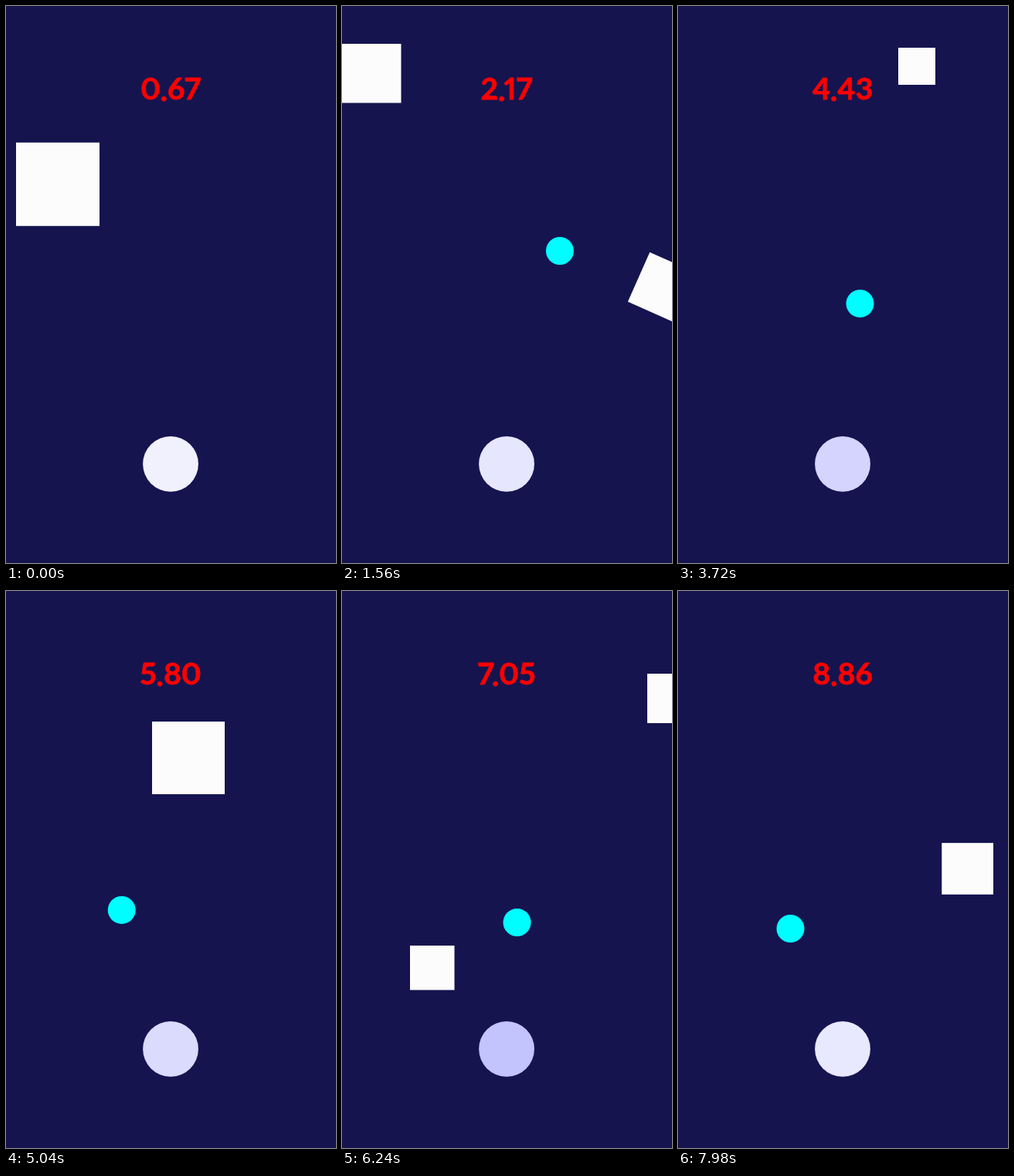
Recreate the animation shown at these times as an HTML page with a canvas. Size 427 by 721 pixels, loop 8 s.

```html
<!DOCTYPE html>
<html lang="en">
<head>
<meta charset="utf-8">
<title>Falling squares</title>
<style>
  html, body { margin: 0; width: 100%; height: 100%; overflow: hidden; background: #15144f; }
  canvas, svg { position: absolute; top: 0; left: 0; }
  text {
    font: bold 39px Lato, sans-serif;
    font-variant-numeric: proportional-nums;
    text-anchor: middle;
    fill: red; stroke: red; stroke-width: 0.8; stroke-linejoin: round;
  }
</style>
</head>
<body>
<canvas id="stage" width="427" height="721"></canvas>
<svg width="427" height="721">
  <text x="213" y="120.5"><tspan id="whole"></tspan><tspan dy="2.5">.</tspan><tspan id="decimals" dy="-2.5"></tspan></text>
</svg>
<script>
const ctx = document.getElementById('stage').getContext('2d');
const whole = document.getElementById('whole');
const decimals = document.getElementById('decimals');
const LOOP = 8000, STEP = 60, GRAVITY = 755;
const FIRST_SPAWN = -514, SPAWN_EVERY = 960;

// Squares appear at rest at a steady beat; some are later knocked away by the ball.
const squares = [
  { x: 13, y: 25, size: 108 },
  { x: 313, y: -6, size: 70, hit: { at: 1290, push: 252, keep: 0.23 } },
  { x: 0, y: 40, size: 76.5 },
  { x: 41, y: 44, size: 42.4 },
  { x: 285, y: -4.6, size: 48, hit: { at: 4300, push: 500, keep: 0.8 } },
  { x: 189, y: -45.6, size: 94, hit: { at: 5280, push: 215, keep: 0.9 } },
  { x: 88, y: 86, size: 57.5 },
  { x: 395, y: 106.6, size: 64 },
  { x: 341.3, y: 76, size: 66.7 }
];

// Turning points of the ball's sideways swing: time, x
const BALL_START = 780;
const swing = [
  [1300, 302], [1800, 264], [3720, 235.5], [4300, 267],
  [4950, 145.5], [5600, 226.5], [6300, 226.5], [7680, 145.5]
];

const clamp = v => Math.min(1, Math.max(0, v));
const smooth = p => p * p * (3 - 2 * p);
const wave = (t, peak, period) => Math.cos(2 * Math.PI * (t - peak) / period);
const fall = seconds => GRAVITY * seconds * seconds / 2;

function ballX(t) {
  return swing.reduce((x, [time, target], i) => {
    const from = i ? swing[i - 1][0] : BALL_START;
    return x + (target - x) * smooth(clamp((t - from) / (time - from)));
  }, 290);
}

// Sinks ever more slowly
const ballY = t => 437 - 120 * (1 - clamp((t - 1560) / 6300)) ** 2;

function disc(x, y, radius, color) {
  ctx.fillStyle = color;
  ctx.beginPath();
  ctx.arc(x, y, radius, 0, 2 * Math.PI);
  ctx.fill();
}

function drawSquare({ x, y, size, hit }, index, t) {
  const born = FIRST_SPAWN + index * SPAWN_EVERY;
  if (t < born) return;
  const free = ((hit ? Math.min(t, hit.at) : t) - born) / 1000;
  let cx = x + size / 2, cy = y + size / 2 + fall(free), angle = 0;
  if (hit && t > hit.at) {
    const s = (t - hit.at) / 1000;
    cx += hit.push * s;
    cy += hit.keep * GRAVITY * free * s + fall(s);
    angle = hit.push * s / 163;
  }
  ctx.save();
  ctx.translate(cx, cy);
  ctx.rotate(angle);
  ctx.fillStyle = '#fcfcfd';
  ctx.fillRect(-size / 2, -size / 2, size, size);
  ctx.restore();
}

function draw(now) {
  const t = Math.max(120, Math.floor(now % LOOP / STEP) * STEP);
  ctx.fillStyle = '#15144f';
  ctx.fillRect(0, 0, 427, 721);

  squares.forEach((square, i) => drawSquare(square, i, t));

  const level = Math.round(223 + 18 * wave(t, 1700, LOOP) + 12 * wave(t, 200, 2450));
  disc(213, 592.8, 35.9, `rgb(${level}, ${level}, 254)`);
  if (t >= BALL_START) disc(ballX(t), ballY(t), 18, '#00fdff');

  const score = 0.67445 + 0.06251 * (t - 120) / STEP;
  [whole.textContent, decimals.textContent] = score.toFixed(2).split('.');

  requestAnimationFrame(draw);
}
requestAnimationFrame(draw);
</script>
</body>
</html>
```
